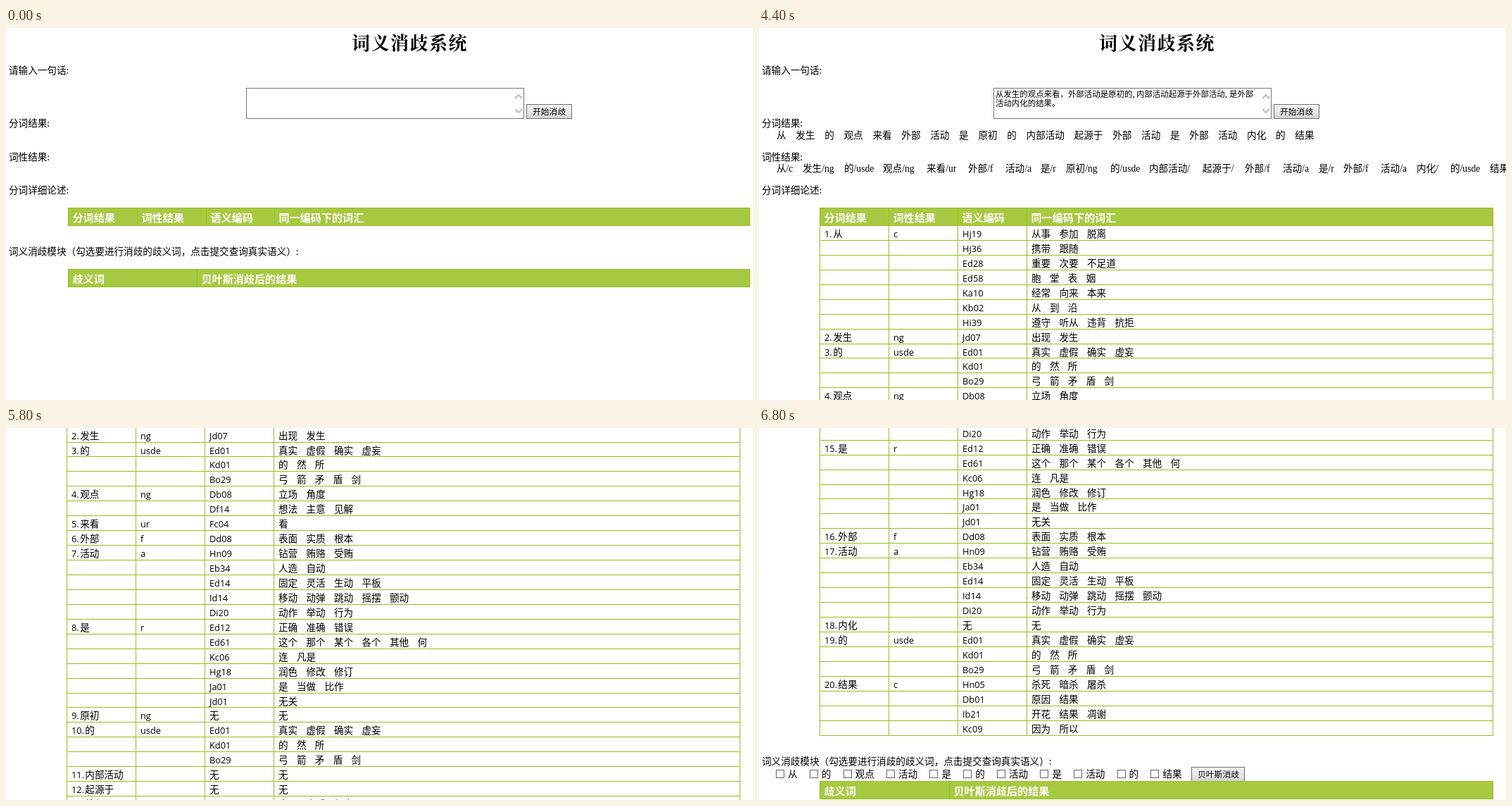
These frames come from a looping animation (1061x528 px, 8 s). An HTML page:

```html
<!DOCTYPE html>
<html lang="zh-CN">
<head>
<meta charset="utf-8">
<style>
  html, body { margin: 0; width: 100%; height: 100%; overflow: hidden; background: #fefefe; }
  svg { display: block; width: 100vw; height: 100vh; }
  text { font: 13.6px "Noto Sans CJK SC", "Noto Sans CJK", sans-serif; white-space: pre; }
  .title { font: 600 26px "Noto Serif CJK SC", "Noto Sans CJK SC", "Noto Sans CJK", serif; letter-spacing: 1.5px; }
  .head { font-size: 15.1px; font-weight: bold; fill: #fff; }
  .latin { font: 12.8px "Open Sans", sans-serif; }
  .tag { font-family: "Liberation Serif", "Noto Sans CJK SC", "Noto Sans CJK", serif; }
  .input { font-size: 11.44px; }
  .button { font-size: 11.8px; }
  rect, line { shape-rendering: crispEdges; }
</style>
</head>
<body>
<svg viewBox="0 0 1061 528">
  <defs>
    <linearGradient id="face" x2="0" y2="1">
      <stop stop-color="#f2f2f2"/><stop offset=".5" stop-color="#e9e9e9"/><stop offset="1" stop-color="#d2d2d2"/>
    </linearGradient>
  </defs>
</svg>
<script>
const LOOP = 8000, EM = 13.6, ROW = 20.94, FIRST_ROW = 280;
const GREEN = '#a7c942', LINE = '#98bf21';

const sentence = '从 发生 的 观点 来看 外部 活动 是 原初 的 内部活动 起源于 外部 活动 是 外部 活动 内化 的 结果'.split(' ');
const tagX = [25, 62, 121, 176, 238, 297, 350, 400, 436, 499, 554, 630, 690, 744, 795, 830, 883, 934, 982, 1038];
const tags = { 从: 'c', 发生: 'ng', 的: 'usde', 观点: 'ng', 来看: 'ur', 外部: 'f', 活动: 'a', 是: 'r', 原初: 'ng', 结果: 'c' };
const senses = {
  从: 'Hj19 从事 参加 脱离|Hj36 携带 跟随|Ed28 重要 次要 不足道|Ed58 胞 堂 表 姻|Ka10 经常 向来 本来|Kb02 从 到 沿|Hi39 遵守 听从 违背 抗拒',
  发生: 'Jd07 出现 发生',
  的: 'Ed01 真实 虚假 确实 虚妄|Kd01 的 然 所|Bo29 弓 箭 矛 盾 剑',
  观点: 'Db08 立场 角度|Df14 想法 主意 见解',
  来看: 'Fc04 看',
  外部: 'Dd08 表面 实质 根本',
  活动: 'Hn09 钻营 贿赂 受贿|Eb34 人造 自动|Ed14 固定 灵活 生动 平板|Id14 移动 动弹 跳动 摇摆 颤动|Di20 动作 举动 行为',
  是: 'Ed12 正确 准确 错误|Ed61 这个 那个 某个 各个 其他 何|Kc06 连 凡是|Hg18 润色 修改 修订|Ja01 是 当做 比作|Jd01 无关',
  结果: 'Hn05 杀死 暗杀 屠杀|Db01 原因 结果|Ib21 开花 结果 凋谢|Kc09 因为 所以'
};

function add(parent, name, attrs = {}, content = '') {
  const node = document.createElementNS('http://www.w3.org/2000/svg', name);
  for (const key in attrs) node.setAttribute(key, attrs[key]);
  node.textContent = content;
  return parent.appendChild(node);
}
const group = parent => add(parent, 'g');
const text = (parent, x, y, content, cls = '') => add(parent, 'text', { x, y, class: cls }, content);
const line = (parent, x1, y1, x2, y2) => add(parent, 'line', { x1, y1, x2, y2, stroke: LINE });
const box = (parent, x, y, width, height, fill, stroke) =>
  add(parent, 'rect', { x: x + .5, y: y + .5, width: width - 1, height: height - 1, fill, stroke });
const show = (node, on) => node.setAttribute('display', on ? 'inline' : 'none');

// Lays words out left to right; `draw` receives each word and its x.
function flow(words, x, gap, draw) {
  for (const word of words) {
    draw(word, x);
    x += word.length * EM + gap;
  }
}

function header(parent, left, right, top, columns, labels) {
  box(parent, left, top, right - left, 26, GREEN, LINE);
  columns.forEach((x, i) => {
    if (i) line(parent, x + .5, top, x + .5, top + 26);
    text(parent, x + 6.5, top + 19.5, labels[i], 'head');
  });
}

function button(parent, x, y, width, label) {
  const face = box(parent, x, y, width, 21, 'url(#face)', '#707070');
  text(parent, x + 9, y + 14.5, label, 'button');
  return face;
}

const svg = document.querySelector('svg');
const page = group(svg);
const form = group(page), home = group(page), results = group(page);

// Labels and input form
[['请输入一句话:', 65], ['分词结果:', 140], ['词性结果:', 188], ['分词详细论述:', 234.5]]
  .forEach(([label, y]) => text(page, 4, y, label));
text(form, 491, 31, '词义消歧系统', 'title');
const field = box(form, 341, 85, 395, 44, '#fefefe', '#777');
for (const d of ['M723 100l5-5 5 5', 'M723 115l5 5 5-5'])
  add(form, 'path', { d, fill: 'none', stroke: '#bdbdbd', 'stroke-width': 2 });
const typed = group(form);
text(typed, 344, 98, '从发生的观点来看，外部活动是原初的,', 'input');
text(typed, 544, 98, '内部活动起源于外部活动,', 'input');
text(typed, 676, 98, '是外部', 'input');
text(typed, 344, 110.5, '活动内化的结果。', 'input');
const caret = add(form, 'rect', { width: 1, height: 12 });
const submit = button(form, 739, 108, 65, '开始消歧');

// Headings of both tables
const question = '词义消歧模块（勾选要进行消歧的歧义词，点击提交查询真实语义）:';
const detailLabels = ['分词结果', '词性结果', '语义编码', '同一编码下的词汇'];
const answerLabels = ['歧义词', '贝叶斯消歧后的结果'];
header(home, 88, 1057, 255, [88, 186, 284, 381], detailLabels);
text(home, 4, 321.5, question);
header(home, 88, 1057, 342, [88, 271], answerLabels);

// Analysis results
flow(sentence, 25, 13.7, (word, x) => text(results, x, 157, word));
sentence.forEach((word, i) => text(results, tagX[i], 203.5, `${word}/${tags[word] || ''}`, 'tag'));
header(results, 86, 1043, 255, [86, 184, 282, 380], detailLabels);

let row = 0;
sentence.forEach((word, i) => {
  (senses[word] || '无 无').split('|').forEach((entry, k) => {
    const y = Math.round(FIRST_ROW + 17 + row * ROW);
    const [code, ...synonyms] = entry.split(' ');
    if (!k) {
      const number = `${i + 1}.`;
      text(results, 93, y, number, 'latin');
      text(results, 91 + number.length * 7.1, y, word);
      text(results, 191, y, tags[word] || '', 'latin');
    }
    text(results, 289, y, code, code === '无' ? '' : 'latin');
    flow(synonyms, 387, 12.3, (synonym, x) => text(results, x, y, synonym));
    row++;
    const bottom = Math.round(FIRST_ROW + row * ROW) + .5;
    line(results, 86, bottom, 1043, bottom);
  });
});
for (const x of [86, 184, 282, 380, 1042])
  line(results, x + .5, FIRST_ROW, x + .5, Math.round(FIRST_ROW + row * ROW));

text(results, 4, 1536.5, question);
flow('从 的 观点 活动 是 的 活动 是 活动 的 结果'.split(' '), 24, 34.2, (word, x) => {
  box(results, Math.round(x), 1544, 12, 12, '#fff', '#666');
  text(results, x + 17, 1554.5, word);
});
button(results, 614, 1540, 76, '贝叶斯消歧');
header(results, 86, 1043, 1560, [86, 270], answerLabels);

// Floating ball at the lower edge
const ball = group(svg);
add(ball, 'circle', { cx: 947, cy: 532.5, r: 21.5, fill: '#fff', stroke: '#3d92ee', 'stroke-width': 2 });
add(ball, 'circle', { cx: 947, cy: 533, r: 16, fill: '#cfd6e0' });

const scrollTimes = [5200, 5300, 5400, 5800, 5900, 6000, 6300, 6400, 6700, 6800];
const submitLooks = [
  [0, 'url(#face)', '#707070'], [800, '#e6edf2', '#4f83a6'], [1800, 'url(#face)', '#707070'],
  [2200, '#e6edf2', '#5c7f97'], [2300, '#dcecf6', '#3c7fb1'], [2500, '#cfe4f1', '#3c7fb1'],
  [2700, '#e2e9ee', '#5c7f97'], [2800, 'url(#face)', '#707070']
];

function render(t) {
  const within = (from, to) => t >= from && t < to;
  const done = t >= 4400;
  show(home, !done);
  show(results, done);
  show(typed, t >= 1800);
  show(ball, within(800, 2500));
  show(caret, within(800, 2200));
  caret.setAttribute('x', t < 1800 ? 344 : 435);
  caret.setAttribute('y', t < 1800 ? 88 : 100);
  field.setAttribute('stroke', within(800, 2500) ? '#222' : within(200, 800) ? '#444' : '#777');

  const [, fill, stroke] = submitLooks.filter(look => look[0] <= t).pop();
  submit.setAttribute('fill', fill);
  submit.setAttribute('stroke', stroke);

  form.setAttribute('transform', `translate(${done ? -8 : 0})`);
  const scroll = Math.min(1059, 107 * scrollTimes.filter(time => time <= t).length);
  page.setAttribute('transform', `translate(0 ${-scroll})`);
}

const start = performance.now();
function tick() {
  render((performance.now() - start) % LOOP);
  requestAnimationFrame(tick);
}
tick();
</script>
</body>
</html>
```
